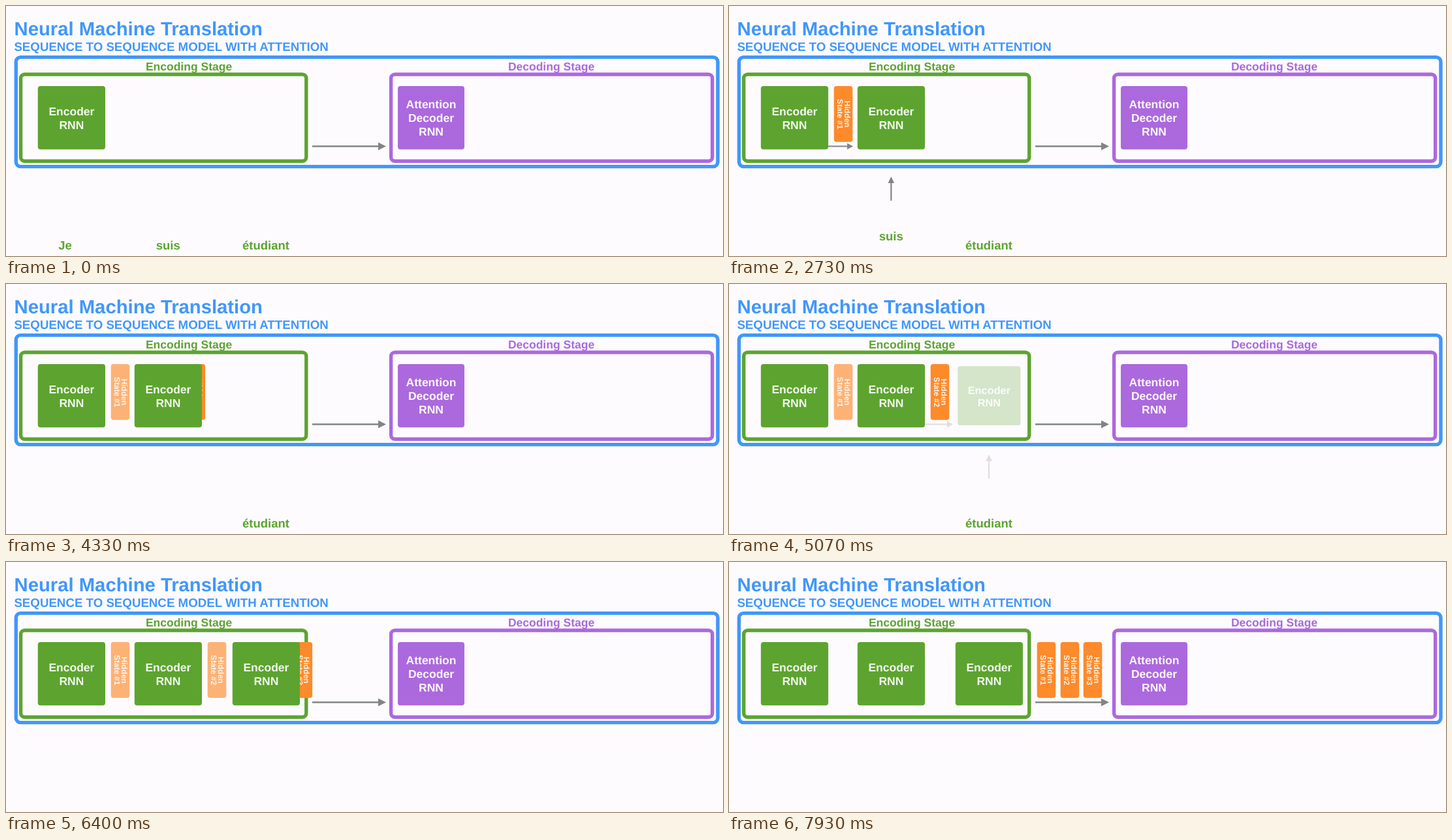
These frames come from a looping animation (1098 px wide and 384 px high, 8 s). An HTML page:

```html
<!DOCTYPE html>
<html lang="en">
<head>
<meta charset="utf-8">
<title>Sequence to sequence model with attention</title>
<style>
html, body { margin: 0; width: 100%; height: 100%; overflow: hidden; background: #fdfbfe; }
svg { display: block; width: 1098px; height: 384px; filter: blur(0.45px); }
text { font-family: "Liberation Sans", Arial, Helvetica, sans-serif; font-weight: bold; text-rendering: geometricPrecision; }
</style>
</head>
<body>
<svg id="stage" viewBox="0 0 1098 384"></svg>
<script>
const LOOP = 8000;
const BLUE = '#4097fb', GREEN = '#5ca42f', PURPLE = '#ab69dd', ORANGE = '#fd8a2b', GREY = '#828483';
const stage = document.getElementById('stage');

function add(parent, tag, attrs, content) {
  const el = document.createElementNS('http://www.w3.org/2000/svg', tag);
  for (const k in attrs) el.setAttribute(k, attrs[k]);
  if (content) el.textContent = content;
  parent.appendChild(el);
  return el;
}

function label(parent, str, x, y, size, fill, anchor = 'middle') {
  return add(parent, 'text', { x, y, fill, 'font-size': size, 'text-anchor': anchor }, str);
}

function frame(x1, y1, x2, y2, stroke, rx) {
  add(stage, 'rect', { x: x1, y: y1, width: x2 - x1, height: y2 - y1, rx, fill: 'none', stroke, 'stroke-width': 5.4 });
}

// Arrow of a given length along +x, placed by a transform.
function arrow(x, y, len, turn, head, half, width) {
  const g = add(stage, 'g', { transform: `translate(${x} ${y}) rotate(${turn})` });
  add(g, 'path', { d: `M0 0H${len - head + 1}`, stroke: GREY, 'stroke-width': width });
  add(g, 'path', { d: `M${len} 0l${-head} ${-half}v${2 * half}z`, fill: GREY });
  return g;
}

function cell(x, width, fill, ink, lines, y) {
  const g = add(stage, 'g', {});
  add(g, 'rect', { x, y: 123, width, height: 97.2, rx: 4, fill });
  lines.forEach((s, i) => label(g, s, x + width / 2, y + i * 21, 17.5, ink));
  return g;
}

function hiddenState(n) {
  const g = add(stage, 'g', {});
  add(g, 'rect', { x: -0.3, y: 123, width: 28.6, height: 85.8, rx: 4, fill: ORANGE });
  [['Hidden', 15.6], ['State #' + n, 4.7]].forEach(([s, x]) => {
    label(g, s, 0, 0, 12.1, '#fff3e6').setAttribute('transform', `translate(${x} 166) rotate(90)`);
  });
  return g;
}

// Static scene
label(stage, 'Neural Machine Translation', 12.6, 44.5, 29.25, BLUE, 'start');
label(stage, 'SEQUENCE TO SEQUENCE MODEL WITH ATTENTION', 12.4, 68.7, 18.72, BLUE, 'start');
frame(15.3, 78.6, 1090, 246.6, BLUE, 7);
frame(22.6, 105, 459.8, 238.3, GREEN, 6);
frame(589.6, 105, 1081.7, 238.3, PURPLE, 6);
label(stage, 'Encoding Stage', 280, 99, 17.5, GREEN);
label(stage, 'Decoding Stage', 835, 99, 17.5, PURPLE);
arrow(469, 215.5, 113, 0, 12, 6, 2.6);

// Moving parts
const encX = [48.8, 196.8, 346.8];
const base = [1, 2, 3].map(hiddenState);
const copy = [1, 2].map(hiddenState);
const links = [arrow(152, 215.5, 38, 0, 9, 4.8, 2), arrow(301, 215.5, 42, 0, 9, 4.8, 2)];
const encoders = encX.map(x => cell(x, 103.2, GREEN, '#f3f9ee', ['Encoder', 'RNN'], 168.3));
cell(600, 102, PURPLE, '#fdf8ff', ['Attention', 'Decoder', 'RNN'], 157.3);
const wordX = [90.5, 248.3, 398];
const inputs = wordX.map(x => arrow(x, 299, 37, -90, 10, 4.8, 2.2));
const words = ['Je', 'suis', 'étudiant'].map((s, i) => label(stage, s, wordX[i], 374, 18.5, GREEN));

const ramp = (t, a, b) => Math.min(1, Math.max(0, (t - a) / (b - a)));
const ease = (t, a, b) => (1 - Math.cos(Math.PI * ramp(t, a, b))) / 2;
const mix = (a, b, p) => a + (b - a) * p;
const alpha = (el, a) => el.setAttribute('opacity', a.toFixed(3));
const place = (el, x) => el.setAttribute('transform', `translate(${x.toFixed(2)} 0)`);

const DIM = 0.65;
// Per word: fade-in of cell and arrows, rise, word cut, arrow fade-out
const steps = [
  { show: [790, 960], rise: [780, 1130], cut: 1640, hide: [1630, 1640] },
  { show: [2450, 2690], rise: [2620, 2940], cut: 3330, hide: [3400, 3540] },
  { show: [5010, 5250], rise: [5180, 5500], cut: 5890, hide: [5960, 6100] }
];
// Per state: emerge beside its cell, send a copy onward, then join the queue
const states = [
  { from: 124, rest: 161, out: [1580, 2220], send: [2920, 3310], end: 472, go: [6735, 7785] },
  { from: 272, rest: 309, out: [4180, 4820], send: [5480, 5870], end: 508, go: [6470, 7420] },
  { from: 384, rest: 384, out: [6090, 6091], end: 543, go: [6090, 6850] }
];

function draw(t) {
  steps.forEach((s, i) => {
    const shown = ramp(t, ...s.show);
    const lit = shown * (1 - ramp(t, ...s.hide));
    alpha(inputs[i], lit);
    alpha(words[i], t < s.cut ? 1 : 0);
    words[i].setAttribute('y', mix(374, 322.5, ease(t, ...s.rise)).toFixed(2));
    if (!i) return;
    alpha(links[i - 1], lit);
    alpha(encoders[i], shown);
    const k = mix(0.91, 1, shown), cx = encX[i] + 51.6, cy = 171.6;
    encoders[i].setAttribute('transform', `translate(${cx} ${cy}) scale(${k}) translate(${-cx} ${-cy})`);
  });

  states.forEach((s, i) => {
    const go = ease(t, ...s.go);
    place(base[i], mix(mix(s.from, s.rest, ease(t, ...s.out)), s.end, go));
    const dim = s.send && t >= s.send[0];
    alpha(base[i], t < s.out[0] ? 0 : dim ? mix(DIM, 1, go) : 1);
    if (!s.send) return;
    place(copy[i], s.rest + 47 * ease(t, ...s.send));
    alpha(copy[i], dim && t < s.send[1] ? 1 : 0);
  });
}

let start = null;
function tick(now) {
  if (start === null) start = now;
  draw((now - start) % LOOP);
  requestAnimationFrame(tick);
}
draw(0);
requestAnimationFrame(tick);
</script>
</body>
</html>
```
